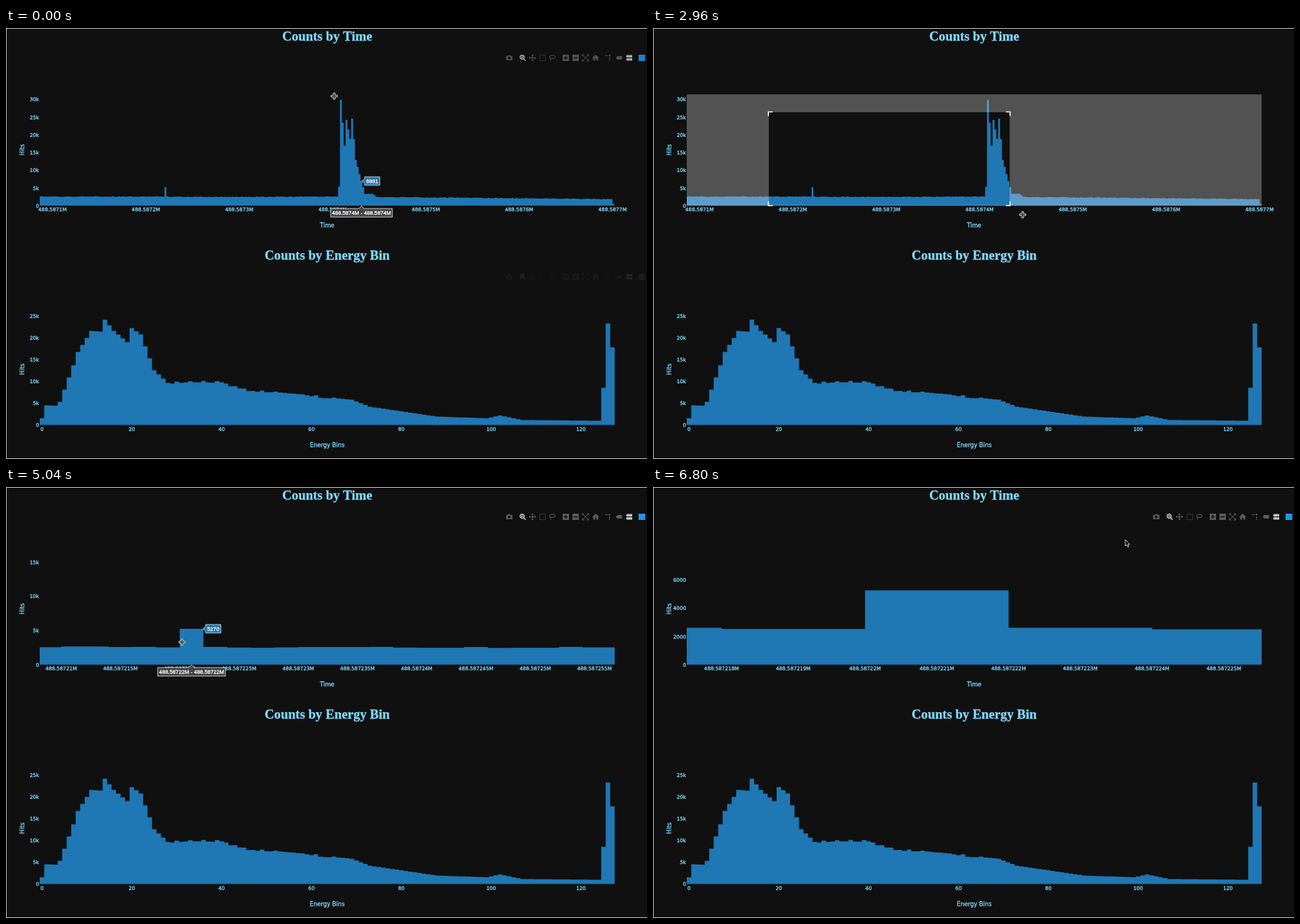
An HTML page with a canvas for the animation above (6880 ms loop, 912 by 614 pixels).

```html
<!DOCTYPE html>
<html lang="en">
<head>
<meta charset="utf-8">
<title>Counts</title>
<style>
html, body { margin: 0; width: 100%; height: 100%; overflow: hidden; background: #101010; }
canvas { display: block; }
</style>
</head>
<body>
<canvas id="stage" width="912" height="614"></canvas>
<script>
const ctx = document.getElementById('stage').getContext('2d');
const LOOP = 6880, STEP = 80;
const BAR = '#1f77b4', INK = '#7fdbff';
const LEFT = 48, RIGHT = 866, TOP = 94.5, BASE = 253.3, BASE2 = 565.5;
const SANS = '"DejaVu Sans", Verdana, sans-serif';
const ARIAL = '"Liberation Sans", Arial, sans-serif';
const SERIF = '"Liberation Serif", Times, serif';

// Each zoom level runs from its time until the next; a drag starts at grab.
// Chart time is in units after 488.5872M, hits are in thousands.
const views = [
  { from: 0,    enter: 1600, grab: 2240, t0: -113.7,  t1: 502.3,  step: 100, max: 31.45, yStep: 5, digits: 4 },
  { from: 3280, enter: 3280, grab: 4080, t0: -25.7,   t1: 246.4,  step: 50,  max: 26.33, yStep: 5, digits: 4 },
  { from: 4720, enter: 4720, grab: 5580, t0: 8.19,    t1: 56.7,   step: 5,   max: 16.29, yStep: 5, digits: 5 },
  { from: 6080, enter: 6080, grab: LOOP, t0: 17.515,  t1: 25.527, step: 1,   max: 7.9,   yStep: 2, digits: 6 }
];
for (const v of views) {
  v.sx = (RIGHT - LEFT) / (v.t1 - v.t0);
  v.x = t => LEFT + (t - v.t0) * v.sx;
  v.y = k => BASE - k * (BASE - TOP) / v.max;
  v.bin = x => Math.floor((v.t0 + (x - LEFT) / v.sx) / 2) * 2;
}

// Pointer: time, x, y
const path = [
  [-100, 506, 112], [0, 467, 97], [400, 391, 28], [1600, 129, 45], [2080, 164.8, 120], [2240, 164.8, 120],
  [2400, 230, 172], [2960, 526, 266], [3280, 526, 266], [3680, 332, 217], [3920, 150, 155], [4080, 150, 155],
  [4480, 277, 264], [4640, 296, 265], [4720, 296, 265], [5360, 205, 177], [5580, 205, 177],
  [5680, 279, 233], [5840, 340, 265], [6080, 340, 265], [6720, 672, 75]
];
// Time, hits
const hitKeys = [[-114, 2.6], [18, 2.6], [20, 5.27], [22, 2.56], [88, 2.529], [204, 2.6], [206, 5.4], [208, 29.9],
  [212, 17], [214, 24.2], [218, 18.9], [220, 24.6], [224, 13], [230, 6.991], [234, 3.4], [242, 3.4], [246, 2.5],
  [498, 1.9], [500, .6]];
// Energy bin, height
const energyKeys = [[0, 9.5], [1, 28], [3, 27.5], [4, 33], [7, 85], [8, 104], [11, 134], [13, 133], [14, 150],
  [16, 134], [19, 118], [20, 138], [22, 129], [25, 78], [28, 60], [40, 62], [44, 51], [69, 36], [73, 26],
  [88, 12], [99, 9.5], [102, 13.5], [107, 7], [124, 6], [125, 53], [126, 144.5], [127, 110.5]];

const clamp = (v, lo = 0, hi = 1) => Math.min(hi, Math.max(lo, v));

// Linear interpolation between key points.
function track(keys, t, col = 1) {
  let i = 1;
  while (i < keys.length - 1 && keys[i][0] < t) i++;
  const a = keys[i - 1], b = keys[i];
  return a[col] + (b[col] - a[col]) * clamp((t - a[0]) / (b[0] - a[0]));
}

// Only the quiet background is noisy.
function hits(t) {
  const k = track(hitKeys, t);
  return k < 3 ? k + .07 * Math.sin((t - 88) ** 2) : k;
}

const energy = n => track(energyKeys, n) + (n > 28 && n < 66 ? 1.5 * Math.sin(n * n) : 0);

function text(s, x, y, size, { font = SANS, color = INK, align = 'center', weight = '' } = {}) {
  ctx.font = `${weight} ${size}px ${font}`;
  ctx.fillStyle = ctx.strokeStyle = color;
  ctx.lineWidth = .3;
  ctx.textAlign = align;
  ctx.fillText(s, x, y);
  ctx.strokeText(s, x, y);
}

function upright(s, x, y) {
  ctx.save();
  ctx.translate(x, y);
  ctx.rotate(-Math.PI / 2);
  text(s, 0, 3, 8.4);
  ctx.restore();
}

const thousands = k => k ? k + 'k' : '0';
const stamp = (t, digits) => (488.5872 + t / 1e6).toFixed(digits);

// Fills a row of touching bars as one outline.
function bars(count, edge, top, base) {
  ctx.beginPath();
  ctx.moveTo(edge(0), base);
  for (let i = 0; i < count; i++) {
    ctx.lineTo(edge(i), top(i));
    ctx.lineTo(edge(i + 1), top(i));
  }
  ctx.lineTo(edge(count), base);
  ctx.fillStyle = BAR;
  ctx.fill();
}

function timeChart(v) {
  const first = v.bin(LEFT), count = (Math.min(500, v.bin(RIGHT)) - first) / 2 + 1;
  ctx.save();
  ctx.beginPath();
  ctx.rect(LEFT, TOP, RIGHT - LEFT, BASE - TOP);
  ctx.clip();
  bars(count, i => v.x(first + 2 * i), i => v.y(hits(first + 2 * i)), BASE);
  ctx.restore();
}

function timeLabels(v) {
  for (let k = 0; k <= v.max; k += v.yStep)
    text(v.yStep < 5 ? k * 1000 : thousands(k), 47, v.y(k) + 2.6, 7.15, { align: 'right' });
  for (let t = Math.ceil(v.t0 / v.step) * v.step; t <= v.t1; t += v.step)
    text(stamp(t, 6).replace(/0+$/, '') + 'M', v.x(t), 261, 7.15);
  text('Time', 457, 284, 8.4);
  upright('Hits', 22.5, 173.5);
}

function energyChart() {
  const edge = n => LEFT + n * (RIGHT - LEFT) / 128;
  bars(128, edge, n => BASE2 - energy(n), BASE2);
  for (let k = 0; k <= 25; k += 5) text(thousands(k), 47, BASE2 + 2.6 - k * 6.22, 7.15, { align: 'right' });
  for (let n = 0; n <= 120; n += 20) text(n, edge(n + .5), 573.5, 7.15);
  text('Energy Bins', 457, 596.5, 8.4);
  upright('Hits', 22.5, 486);
}

// centre x, outline in a 10 unit box, style, active
const icons = [
  [716, 'M0 2h3l1-1.5h2L7 2h3v7H0zM5 3.2a2.2 2.2 0 1 0 .01 0z', 'fill'],
  [735, 'M7.5 4a3.2 3.2 0 1 1-6.4 0a3.2 3.2 0 1 1 6.4 0M6.6 6.4L9.8 9.8M4.3 2.6v2.8M2.9 4h2.8', 'bold', true],
  [749, 'M5 0v10M0 5h10M3.5 1.5L5 0l1.5 1.5M3.5 8.5L5 10l1.5-1.5M1.5 3.5L0 5l1.5 1.5M8.5 3.5L10 5 8.5 6.5', 'line'],
  [763.5, 'M.5 .5h9v9h-9z', 'dash'],
  [777.5, 'M5 1c6 0 6 5 0 5c-6 0-6-5 0-5M2 5.2c-2 1 1 2 0 4.5', 'line'],
  [796.5, 'M0 0h10v10H0zM4.2 2v2.2H2v1.6h2.2V8h1.6V5.8H8V4.2H5.8V2z', 'fill'],
  [810.5, 'M0 0h10v10H0zM2 4.2h6v1.6H2z', 'fill'],
  [824.5, 'M1 1l8 8M9 1L1 9M0 3V0h3M7 0h3v3M10 7v3H7M3 10H0V7', 'line'],
  [839, 'M5 0l5.5 5H9v4.5H6v-3H4v3H1V5H-.5z', 'fill'],
  [856.5, 'M0 1.5h5M7.5 4v6M6.8 .8h1.4v1.4H6.8z', 'line'],
  [872, 'M0 5l2.5-2.8H10v5.6H2.5z', 'fill'],
  [886.5, 'M0 2.5L1.5 .6H10v3.8H1.5zM0 7.5l1.5-1.9H10v3.8H1.5z', 'fill', true]
].map(([x, d, style, on]) => ({ x, shape: new Path2D(d), style, on }));

function toolbar(y, alpha) {
  if (alpha <= 0) return;
  for (const { x, shape, style, on } of icons) {
    ctx.save();
    ctx.globalAlpha = alpha * (on ? .75 : .32);
    ctx.translate(x - 4.5, y - 4.5);
    ctx.scale(.9, .9);
    ctx.fillStyle = ctx.strokeStyle = '#fff';
    ctx.lineWidth = style === 'bold' ? 1.6 : 1.1;
    if (style === 'dash') ctx.setLineDash([1.5, 1.5]);
    if (style === 'fill') ctx.fill(shape, 'evenodd');
    else ctx.stroke(shape);
    ctx.restore();
  }
  ctx.globalAlpha = alpha;
  ctx.fillStyle = '#2496e6';
  ctx.fillRect(900, y - 4.5, 9.5, 9);
  ctx.globalAlpha = 1;
}

function bubble(points, fill) {
  ctx.beginPath();
  points.forEach(([x, y]) => ctx.lineTo(x, y));
  ctx.closePath();
  ctx.fillStyle = fill;
  ctx.fill();
  ctx.strokeStyle = '#e8e8e8';
  ctx.lineWidth = .8;
  ctx.stroke();
}

function hover(v, x, y) {
  if (x < LEFT || x > RIGHT || y < TOP || y > BASE) return;
  const t = v.bin(x), n = Math.round(hits(t) * 1000);
  const mid = v.x(t + 1), tipX = v.x(t + 2) - .5, tipY = Math.max(TOP, v.y(hits(t)));
  const style = { font: ARIAL, color: '#fff' };

  const range = `${stamp(t, v.digits)}M - ${stamp(t + 2, v.digits)}M`;
  ctx.font = `7.7px ${ARIAL}`;
  const half = ctx.measureText(range).width / 2 + 2;
  bubble([[mid, 253.5], [mid + 3.5, 257.2], [mid + half, 257.2], [mid + half, 269.3],
    [mid - half, 269.3], [mid - half, 257.2], [mid - 3.5, 257.2]], '#444');
  text(range, mid, 266, 7.7, style);

  const w = ctx.measureText(n).width + 4.5, l = tipX + 3.7;
  bubble([[tipX, tipY], [l, tipY - 3.5], [l, tipY - 6], [l + w, tipY - 6],
    [l + w, tipY + 6], [l, tipY + 6], [l, tipY + 3.5]], BAR);
  text(n, l + w / 2, tipY + 2.8, 7.7, style);
}

// The box trails the pointer slightly.
function selection(grab, t) {
  const x0 = track(path, grab), y0 = track(path, grab, 2);
  const x = clamp(track(path, t - 35), x0, RIGHT), y = clamp(track(path, t - 20, 2), y0, BASE - .8);
  ctx.globalAlpha = clamp((t - grab) / 150);
  ctx.beginPath();
  ctx.rect(LEFT, TOP, RIGHT - LEFT, BASE - TOP);
  ctx.rect(x0, y0, x - x0, y - y0);
  ctx.fillStyle = 'rgba(255,255,255,.275)';
  ctx.fill('evenodd');
  if (x - x0 > 8 && y - y0 > 8) {
    ctx.beginPath();
    for (const [cx, sx] of [[x0 - .6, 1], [x + .6, -1]])
      for (const [cy, sy] of [[y0 - .6, 1], [y + .6, -1]]) {
        ctx.moveTo(cx + 6 * sx, cy);
        ctx.lineTo(cx, cy);
        ctx.lineTo(cx, cy + 6 * sy);
      }
    ctx.strokeStyle = '#fff';
    ctx.lineWidth = 1.5;
    ctx.stroke();
  }
  ctx.globalAlpha = 1;
}

const arrow = new Path2D('M0 0v9l2-1.8 1.5 3.3 1.5-.7-1.4-3.1h2.7z');
const cross = new Path2D('M-4.5-1.2h3.3v-3.3h2.4v3.3h3.3v2.4h-3.3v3.3h-2.4v-3.3h-3.3z');

function cursor(x, y, shape, fill) {
  ctx.save();
  ctx.translate(x, y);
  ctx.fillStyle = fill;
  ctx.fill(shape);
  ctx.strokeStyle = '#ddd';
  ctx.lineWidth = .9;
  ctx.stroke(shape);
  ctx.restore();
}

function draw(t) {
  const v = views.findLast(w => t >= w.from);
  const dragging = t >= v.grab, leaving = t < 480;
  const pointer = leaving || t >= 1600;
  const x = track(path, t), y = track(path, t, 2);

  ctx.fillStyle = '#101010';
  ctx.fillRect(0, 0, 912, 614);
  ctx.fillStyle = '#c8c8c8';
  ctx.fillRect(0, 0, 912, 1);
  ctx.fillRect(0, 0, 1, 614);
  ctx.fillRect(0, 613, 912, 1);

  const title = { font: SERIF, weight: 'bold' };
  text('Counts by Time', 457, 17.8, 18.8, title);
  text('Counts by Energy Bin', 457, 330.3, 18.8, title);

  timeChart(v);
  if (dragging) selection(v.grab, t);
  timeLabels(v);
  energyChart();
  toolbar(42.5, leaving ? .85 - t / 400 : clamp((t - v.enter) / 240) * clamp(1 - (t - v.grab) / 180));
  toolbar(354.5, .12 - t / 600);
  if (pointer && !dragging) hover(v, track(path, t - 125), track(path, t - 125, 2));
  if (pointer) cursor(x, y, ...(dragging || y > TOP ? [cross, '#333'] : [arrow, '#000']));
}

function frame(now) {
  draw(Math.floor(now % LOOP / STEP) * STEP);
  requestAnimationFrame(frame);
}
requestAnimationFrame(frame);
</script>
</body>
</html>
```
